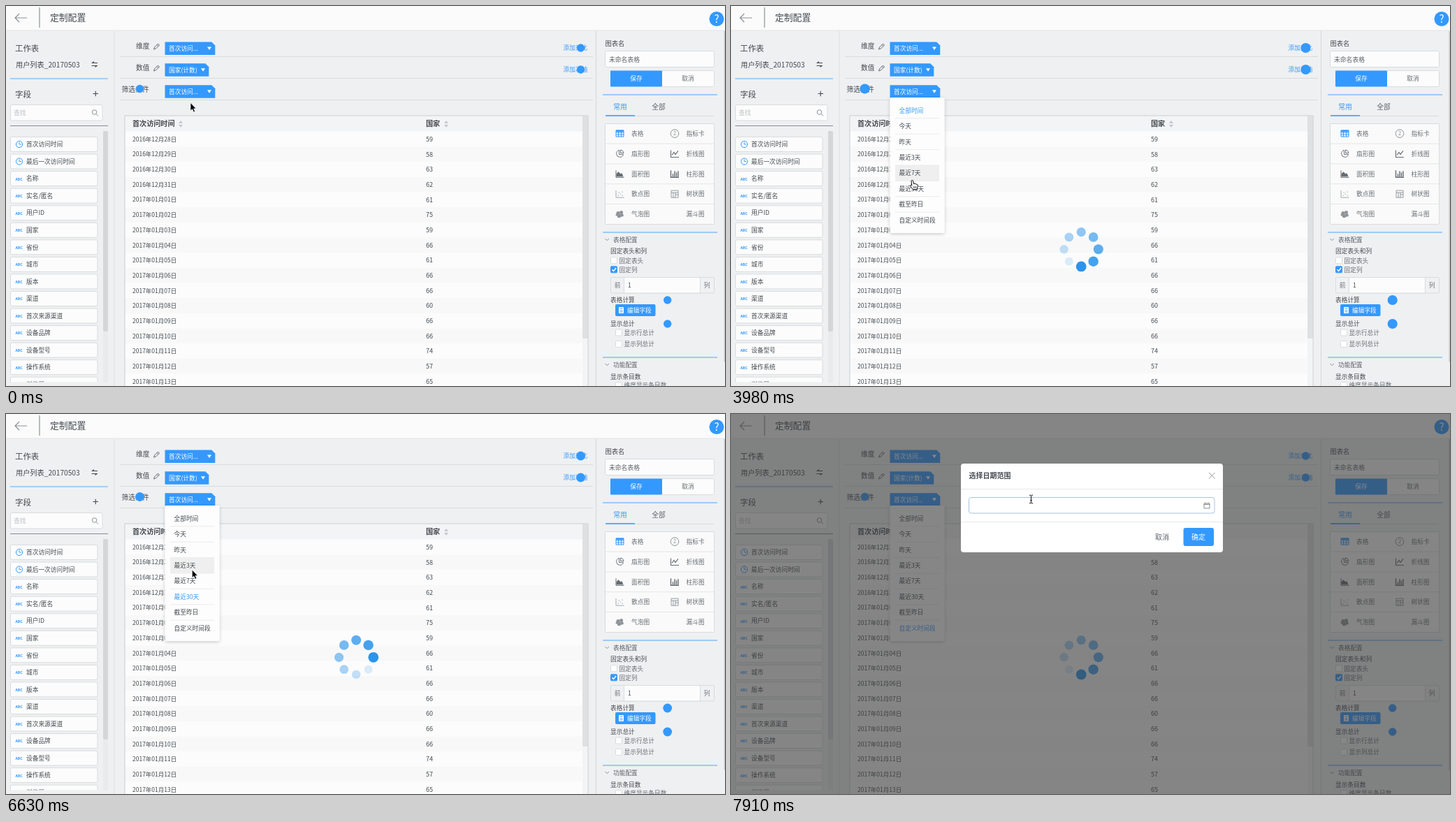
An HTML page that plays this animation: 1029x544 px, repeating every 8000 ms.

```html
<!DOCTYPE html>
<html lang="zh-CN">
<head>
<meta charset="utf-8">
<title>定制配置</title>
<style>
html, body { margin: 0; width: 100%; height: 100%; overflow: hidden; background: #eff0f1; }
svg { display: block; width: 1029px; height: 544px; }
text { font-family: "Noto Sans CJK SC", "Noto Sans CJK JP", "Noto Sans CJK", "Noto Sans", sans-serif; white-space: pre; }
</style>
</head>
<body>
<svg id="stage" viewBox="0 0 1029 544" xmlns="http://www.w3.org/2000/svg"></svg>
<script>
const BLUE = '#3399ff', INK = '#444a50', GREY = '#8b9198', EDGE = '#d9dbdd';
const LOOP = 8000;

// y is the vertical middle of the text
const text = (x, y, s, size = 8.7, fill = INK, more = '') =>
  `<text x="${x}" y="${y + size * 0.37}" font-size="${size}" fill="${fill}" ${more}>${s}</text>`;
const rect = (x, y, w, h, fill, more = '') =>
  `<rect x="${x}" y="${y}" width="${w}" height="${h}" fill="${fill}" ${more}/>`;
const path = (d, stroke = GREY, width = 1, fill = 'none') =>
  `<path d="${d}" stroke="${stroke}" stroke-width="${width}" fill="${fill}"/>`;
const circle = (x, y, r, fill, more = '') =>
  `<circle cx="${x}" cy="${y}" r="${r}" fill="${fill}" ${more}/>`;
const hline = (x1, x2, y, stroke = EDGE, width = 1) => path(`M${x1} ${y}H${x2}`, stroke, width);
const group = (x, y, body) => `<g transform="translate(${x} ${y})">${body}</g>`;
const box = (x, y, w, h, fill = '#fcfcfc', r = 2) =>
  rect(x, y, w, h, fill, `stroke="${EDGE}" rx="${r}"`);
const BOLD = 'font-weight="600"', MEDIUM = 'font-weight="500"', MID = 'text-anchor="middle"';

function header() {
  return rect(0, 0, 1029, 35, '#fbfbfb') + hline(0, 1029, 35, '#e2e4e5') +
    path('M30 17H13M19 11L13 17L19 23', '#8b8f93', 1.2) +
    path('M48 2V31', '#777b80') +
    text(63, 16.3, '定制配置', 12.8, INK, MEDIUM) +
    circle(1017, 18.5, 10.5, BLUE) +
    text(1017, 18.5, '?', 15, '#fff', MID + ' ' + MEDIUM);
}

function sidebar() {
  const fields = ['首次访问时间', '最后一次访问时间', '名称', '实名/匿名', '用户ID', '国家', '省份', '城市',
    '版本', '渠道', '首次来源渠道', '设备品牌', '设备型号', '操作系统', '浏览器'];
  const items = fields.map((name, i) => {
    const y = 198 + i * 24.55;
    const icon = i < 2
      ? circle(19, y, 4.6, 'none', `stroke="${BLUE}"`) + path(`M19 ${y - 3}V${y}H22`, BLUE, 0.9)
      : text(13.5, y + 0.5, 'ABC', 5.2, BLUE, 'font-weight="700"');
    return box(6.5, y - 10.5, 124.5, 21) + icon + text(29, y, name);
  }).join('');
  return path('M155 36V544', '#dcdee0') +
    text(13, 61, '工作表', 11.4, INK, MEDIUM) + text(14, 84, '用户列表_20170503', 10.2) +
    path('M131 81.5H123.5L126 79.5M122.5 85.5H130L127.5 87.5', INK, 1.1) +
    hline(6, 146, 104, '#5fadf8') +
    text(13, 126.5, '字段', 11.5, INK, MEDIUM) + path('M124.5 125.5H132M128.2 121.7V129.3', INK, 1.1) +
    box(6.5, 141.5, 131.5, 22.5) + text(11, 153, '查找', 8.9, '#bcc0c4') +
    circle(126.5, 152, 3.3, 'none', `stroke="${GREY}"`) + path('M129 154.5L132 157.5') +
    hline(6, 146, 171.5, '#858d95') +
    rect(139, 179, 7, 360, '#e9eaeb') + rect(139, 179, 7, 287, '#d4d6d8', 'rx="2"') +
    `<g clip-path="url(#listClip)">${items}</g>`;
}

function chip(y, w, label) {
  const x = 227.5, end = x + w;
  return path(`M${x} ${y - 0.5}H${end - 5}L${end} ${y + 4.5}V${y + 18}H${x}Z`, 'none', 0, BLUE) +
    text(x + 5.5, y + 9, label, 8.7, '#fff') +
    path(`M${end - 11.3} ${y + 6.5}h6l-3 4.5z`, 'none', 0, '#fff');
}

const pencil = y => path(`M211.5 ${y + 4}l1-3l5-5l2 2l-5 5zM216 ${y - 2.5}l2 2`, '#666c72', 1);

function shelves() {
  return text(186, 57, '维度', 9.7) + text(186, 88, '数值', 9.7) + text(165.5, 119, '筛选条件', 9.8) +
    pencil(58) + pencil(89) +
    chip(52, 71.8, '首次访问...') + chip(82.7, 62.8, '国家(计数)') + chip(113.7, 71.8, '首次访问...') +
    [72.5, 103.5, 134.5].map(y => hline(163, 840, y)).join('') +
    text(797.5, 59.5, '添加对比', 8.7, BLUE) + text(797.5, 90.5, '添加次轴', 8.7, BLUE);
}

const sorter = x => path(`M${x - 3} 168l3-4l3 4zM${x - 3} 170l3 4l3-4z`, 'none', 0, '#c5c8cb');

function table() {
  const counts = [59, 58, 63, 62, 61, 75, 59, 66, 61, 66, 66, 60, 66, 66, 74, 57, 65];
  const pad = n => String(n).padStart(2, '0');
  const rows = counts.map((n, i) => {
    const y = 190.6 + i * 21.68;
    const date = i < 4 ? `2016年12月${28 + i}日` : `2017年01月${pad(i - 3)}日`;
    return rect(170.5, y - 10.84, 654, 21.7, i % 2 ? '#f8f8f8' : '#fcfcfc') +
      text(181, y, date, 8.5) + text(601, y, n, 9);
  }).join('');
  return rect(170, 157, 663, 400, '#fcfcfc', `stroke="${EDGE}"`) +
    rect(170.5, 157.5, 655, 22, '#f3f4f6') + rows +
    text(181, 168.7, '首次访问时间', 10.1, INK, BOLD) + text(601, 168.7, '国家', 10.1, INK, BOLD) +
    sorter(250) + sorter(630) +
    rect(825, 157.5, 8, 387, '#f3f4f5') + rect(825, 157.5, 8, 318.5, '#dfe0e2') +
    path('M170 544V157H833V544', '#d3d6d9');
}

const ICONS = [
  path('M-5.5-4.5h11v9h-11zM-5.5-1.5h11M-5.5 1.5h11M-2-4.5v9M2-4.5v9', BLUE, 1) + rect(-5.5, -5, 11, 2.5, BLUE),
  circle(0, 0, 5.8, 'none', `stroke="${GREY}"`) + text(0, 0, '2', 7.5, GREY, MID),
  path('M-1-5A5 5 0 1 0 5 1H-1ZM1-5.5A5 5 0 0 1 5.5-1H1Z', '#70767d', 1),
  path('M-5.5-5V5H6M-4 2L-1-2L1 1L5-4', '#666c73', 1.1),
  path('M-5.5-5V5H6', '#666c73', 1) + path('M-5 4V0L-2-3L1 0L3-1L5 4Z', 'none', 0, '#666c73'),
  path('M-5.5-5V5H6M-2.5 4V0M0 4V-4M2.5 4V-2M5 4V-4', '#666c73', 1.4),
  path('M-5.5-5V5H6M-3 2h1.5M0 0h1.5M-2-2h1.5M3-3h1.5M3 2h1.5', '#a3a8ad', 1),
  path('M-5-5H5V5H-5ZM-5-2H5M-2-2V5M1-2V5M1 1H5', GREY, 0.9),
  [[-2.5, -1.5, 2.6], [2, -2.5, 2.5], [3, 1.5, 2.3], [-1, 2.5, 2.8], [-4.5, 1, 1.5]]
    .map(([x, y, r]) => circle(x, y, r, '#8e949a')).join('')
];

function check(x, y, label, on) {
  return rect(x + 0.5, y - 4.5, 9, 9, on ? BLUE : '#fff', `rx="1" stroke="${on ? BLUE : EDGE}"`) +
    (on ? path(`M${x + 2.5} ${y}l2 2.2l3.6-4.5`, '#fff', 1.4) : '') +
    text(x + 12.5, y, label, 8.7, '#686e74');
}

const section = (y, label) => hline(854, 1018, y - 10, '#4fa5f8') +
  path(`M857.5 ${y - 1}l2.7 2.7l2.7-2.7`, GREY) + text(869, y + 0.5, label, 8.7, '#5c6268');

function panel() {
  const kinds = ['表格', '指标卡', '扇形图', '折线图', '面积图', '柱形图', '散点图', '树状图', '气泡图', '漏斗图'];
  const cells = kinds.map((name, i) => {
    const y = 182.6 + (i >> 1) * 28.85, dx = (i % 2) * 78.5;
    return group(878.5 + dx, y, ICONS[i] || '') + text(895 + dx, y, name, 8.7, '#686e74');
  }).join('');
  const rules = [1, 2, 3, 4].map(i => hline(858, 1013, 168.3 + i * 28.8, '#e4e6e7')).join('');
  return path('M844.5 36V544', '#d3d5d7') + rect(1027.5, 36, 1.5, 474, '#c9cbcd') +
    text(857.5, 54, '图表名', 9.3) +
    box(857.5, 64.5, 156, 23) + text(863, 76.3, '未命名表格', 8.8, '#5c6268') +
    box(938.5, 92.5, 75, 23) + rect(865, 92.5, 74, 23, BLUE, 'rx="1"') +
    text(902, 104, '保存', 8.7, '#fff', MID + ' ' + MEDIUM) + text(976, 104, '取消', 8.7, '#686e74', MID) +
    hline(854, 1018, 127, '#4fa5f8') +
    text(879, 144, '常用', 9.8, BLUE, MID) + text(934, 144, '全部', 9.8, '#5c6268', MID) +
    hline(858, 1013, 157.5) + hline(858, 900, 157, BLUE, 1.6) +
    box(857.5, 168.5, 156, 144, '#fafafa', 1) + rules + cells +
    section(334, '表格配置') +
    text(865, 351, '固定表头和列', 8.7, INK, MEDIUM) +
    check(865, 364.3, '固定表头') + check(865, 377.3, '固定列', true) +
    box(865.5, 388.5, 148, 22.5, '#f0f1f2') + rect(884.5, 388.5, 109, 22.5, '#fcfcfc', `stroke="${EDGE}"`) +
    text(875, 399.7, '前', 8.7, '#686e74', MID) + text(890, 399.7, '1') + text(1003, 399.7, '列', 8.7, '#686e74', MID) +
    text(865, 420.5, '表格计算', 8.7, INK, MEDIUM) +
    rect(872, 427, 57.5, 17, BLUE, 'rx="2"') + rect(877, 431, 7, 9, '#fff', 'rx="1"') +
    path('M878.5 433H882.5M878.5 436H882.5M878.5 438H882.5', BLUE, 0.9) +
    text(889, 435.7, '编辑字段', 8.7, '#fff') +
    text(865, 454.5, '显示总计', 8.7, INK, MEDIUM) +
    check(872, 467.5, '显示行总计') + check(872, 484, '显示列总计') +
    section(513, '功能配置') + text(865, 530.5, '显示条目数', 8.7, INK, MEDIUM) +
    check(872, 543, '维度显示条目数');
}

const RANGES = ['全部时间', '今天', '昨天', '最近3天', '最近7天', '最近30天', '截至昨日', '自定义时间段'];
const PITCH = 22.4, FIRST = 149.6;

function menu() {
  const rows = RANGES.map((name, i) => text(240.5, FIRST + i * PITCH, name, 8.7, INK, 'class="range"') +
    (i < 7 ? hline(235, 298, FIRST + 11.2 + i * PITCH, '#ebecec') : '')).join('');
  return `<g id="menu">${rect(227.5, 131, 78, 194, '#fdfdfd', 'rx="2" filter="url(#shade)"')}` +
    `${rect(235, 0, 63, PITCH, '#efefef', 'id="hover"')}${rows}</g>`;
}

function dialog() {
  return rect(0, 0, 1029, 544, '#373737', 'id="mask"') + `<g id="dialog">` +
    rect(329, 71, 375, 127, '#fff', 'rx="4"') +
    text(340.5, 88.5, '选择日期范围', 10, INK, BOLD) +
    path('M684 84l8.5 8.5M692.5 84l-8.5 8.5', '#999', 1) +
    hline(329, 704, 107.5, '#e6e8ea') + hline(329, 704, 154.5, '#e6e8ea') +
    rect(340.5, 119.5, 351.5, 22.5, '#fff', `id="field" rx="3" stroke="${EDGE}"`) +
    path('M677 128h8v7h-8zM677 129.5h8M679 128v-1.5M683 128v-1.5', '#888e94', 1) +
    text(617, 176, '取消', 10, '#5c6268', MID) +
    rect(647.5, 163, 43.5, 26, BLUE, 'rx="3"') + text(669, 176, '确定', 10, '#fff', MID) + '</g>';
}

const pointers = `<g id="cursor">` +
  `<g id="arrow">${path('M0 0V11.5L2.6 9.2L4.5 13.3L6.5 12.4L4.7 8.4H8.2Z', '#fff', 0.7, '#000')}</g>` +
  `<g id="hand">${path('M-1.5 1C-1.5-.6 1-.6 1.2 1L2 5C2.4 4 4 4.2 4.2 5.3C5 4.5 6 4.9 6.3 6' +
    'C7.3 5.6 8 6.2 7.9 7.3C7.9 9.5 7 10.5 6.6 13H.6C0 11.3-2 9.8-3 7.9C-3.4 6.7-2 6.1-.7 7.6Z', '#000', 1, '#fff') +
    path('M1.8 8.5V11M3.5 8.5V11M5.2 8.5V11', '#000', 0.7)}</g>` +
  `<g id="beam">${path('M-2.5-6Q0-6 0-4.5Q0-6 2.5-6M0-4.5V5M-2.5 6Q0 6 0 4.5Q0 6 2.5 6M-1.2 1.5H1.2', '#111', 1)}</g></g>`;

const DOTS = [[822.5, 60], [822.5, 91], [191.5, 118.5], [946.7, 421], [946.7, 455]];
const beacons = DOTS.map(([x, y]) => circle(x, y, 6, BLUE, 'class="beacon"')).join('');
const spinner = '<g id="spinner">' + Array.from({ length: 8 }, (_, i) => {
  const a = i * Math.PI / 4;
  return circle(501.2 + 24.6 * Math.sin(a), 348.3 - 24.6 * Math.cos(a), 6, '#2c94ea', 'class="bead"');
}).join('') + '</g>';

const stage = document.getElementById('stage');
stage.innerHTML = `<defs><clipPath id="listClip"><rect x="0" y="180" width="139" height="358.5"/></clipPath>
  <filter id="shade" x="-20%" y="-10%" width="140%" height="120%">
  <feDropShadow dx="0" dy="1.5" stdDeviation="2.5" flood-color="#000" flood-opacity=".2"/></filter></defs>` +
  rect(0, 0, 1029, 544, '#eff0f1') + sidebar() + shelves() + table() + panel() + header() +
  beacons + spinner + menu() + dialog() + pointers;

const $ = id => document.getElementById(id);
const all = name => [...stage.querySelectorAll('.' + name)];
const ranges = all('range'), beads = all('bead'), rings = all('beacon');
const show = (id, on) => $(id).setAttribute('display', on ? 'inline' : 'none');

// time, x, y of the pointer tip
const ROUTE = [[0, 264, 138.5], [700, 264, 138.5], [1500, 260, 122], [3100, 260, 122], [3950, 259.5, 249.5],
  [4350, 259.5, 261], [4750, 259.5, 261], [5600, 266, 124], [6150, 266, 124], [7050, 266.5, 304],
  [7661, 266.5, 304], [7910, 429.5, 122]];

function pointerAt(t) {
  const i = Math.max(1, ROUTE.findIndex(k => k[0] >= t));
  const [t0, x0, y0] = ROUTE[i - 1], [t1, x1, y1] = ROUTE[i];
  const u = (t - t0) / (t1 - t0), e = u * u * (3 - 2 * u);
  return [x0 + (x1 - x0) * e, y0 + (y1 - y0) * e];
}

// The screen refreshes in steps, with one long hold before the last pose
function refresh(t) {
  if (t < 90) return 0;
  if (t >= 7910) return 7910;
  return Math.min(7661, Math.max(90, 151 + 147.25 * Math.floor((t - 151) / 147.25)));
}

function draw(time) {
  const t = refresh(time);
  const [x, y] = pointerAt(t);

  const swell = Math.max(0, Math.cos((t - 850) / 1500 * 2 * Math.PI));
  rings.forEach(c => c.setAttribute('r', 5.7 + 1.9 * swell * swell));

  show('spinner', t > 350);
  const head = 1 + Math.round((t - 2654) / 121.9);
  beads.forEach((c, i) => {
    const age = (((head - i) % 8) + 8) % 8;
    c.setAttribute('opacity', 1 - age * 0.12);
    c.setAttribute('r', 7.4 - age * 0.2);
  });

  const chosen = t < 4700 ? 0 : t < 7500 ? 5 : 7;
  const open = (t > 3150 && t < 4700) || t > 6150;
  const over = Math.floor((y - FIRST + 11.2) / PITCH);
  show('menu', open);
  show('hover', over >= 0 && over < 8 && over !== chosen && t < 7500);
  $('hover').setAttribute('y', FIRST - 11.2 + over * PITCH);
  ranges.forEach((el, i) => el.setAttribute('fill', i === chosen ? BLUE : INK));

  const modal = t > 7500, settled = t > 7600;
  show('mask', modal);
  show('dialog', modal);
  $('mask').setAttribute('opacity', settled ? 0.6 : 0.26);
  $('dialog').setAttribute('opacity', settled ? 1 : 0.65);
  const s = settled ? 1 : 0.968;
  $('dialog').setAttribute('transform', `translate(516.5 134.5) scale(${s}) translate(-516.5 -134.5)`);
  $('field').setAttribute('stroke', t >= 7910 ? '#a9c3dc' : EDGE);

  const kind = t < 1050 ? 'arrow' : t < 6500 ? 'hand' : t < 7700 ? 'arrow' : 'beam';
  ['arrow', 'hand', 'beam'].forEach(id => show(id, id === kind));
  $('cursor').setAttribute('transform', `translate(${x} ${y})`);
}

const start = performance.now();
function loop() {
  draw((performance.now() - start) % LOOP);
  requestAnimationFrame(loop);
}
loop();
</script>
</body>
</html>
```
